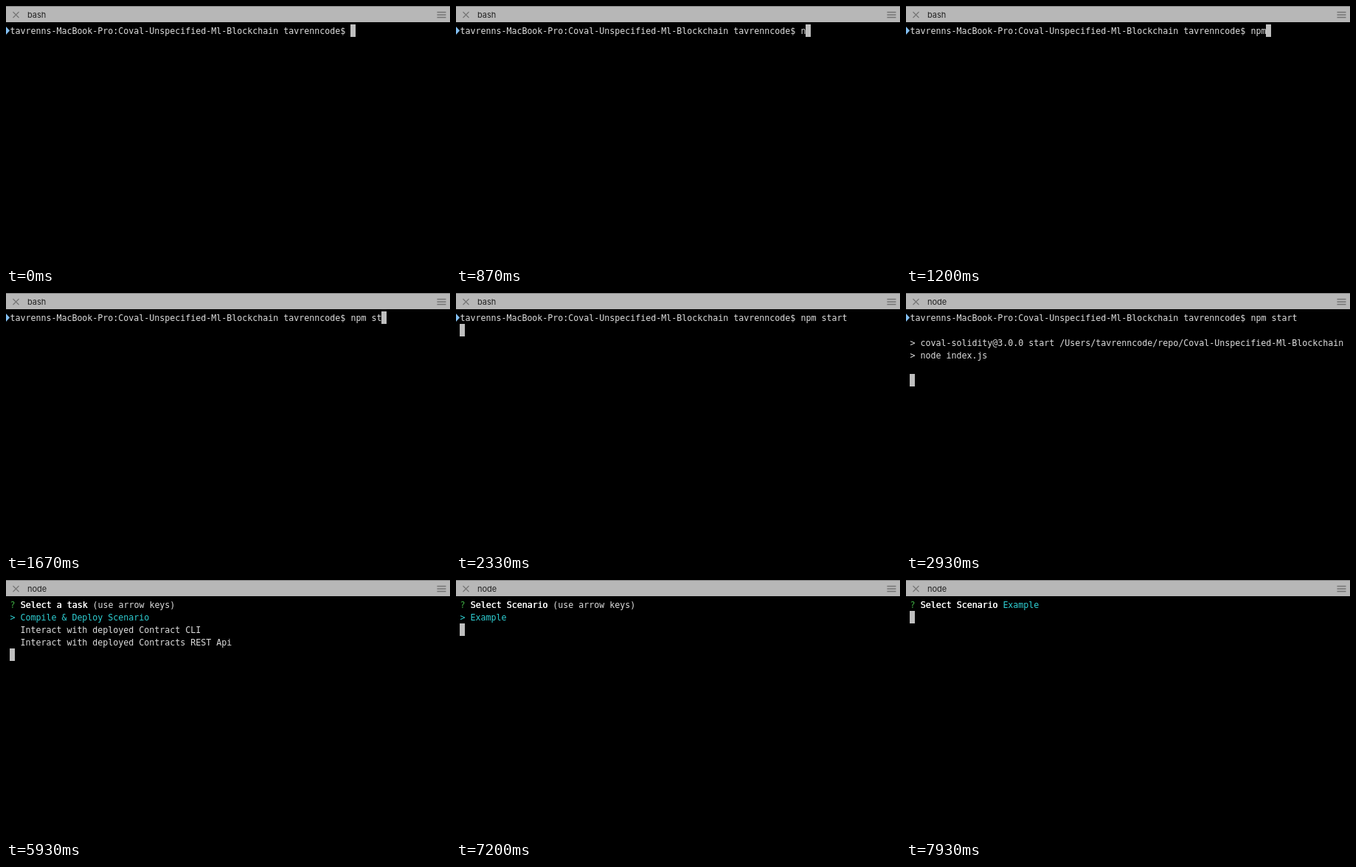
Animation, 602 px wide and 352 px high, one loop 8 s. Source, as an HTML page:

```html
<!DOCTYPE html>
<html lang="en">
<head>
<meta charset="utf-8">
<title>Terminal</title>
<style>
  html, body { margin: 0; width: 100%; height: 100%; overflow: hidden; background: #000; }
  .stage { position: relative; width: 602px; height: 352px; overflow: hidden; background: #000; }
  .stage * { animation-duration: 8s; animation-timing-function: step-end; animation-iteration-count: infinite; }

  .bar { position: absolute; inset: 0 0 auto; height: 22px; box-sizing: border-box; background: #b7b7b7; border-top: 1px solid #858585; }
  .bar svg { position: absolute; left: 0; top: -1px; }
  .tab { position: absolute; left: 29px; top: 3px; font: 11px/16px Inter, sans-serif; color: #202020; }
  .bash { animation-name: bash; }
  .node { animation-name: node; }

  pre { position: absolute; left: 5.4px; top: 26px; margin: 0; color: #dedede;
        font: 11.64px/17px "DejaVu Sans Mono", monospace; font-variant-ligatures: none; }
  b { font-weight: normal; color: #fff; text-shadow: .5px 0 #fff; }
  i { font-style: normal; color: #2fd0d4; }
  u { text-decoration: none; color: #3fae43; }

  .mark { position: absolute; left: 0; top: 28px; width: 5px; height: 11px; background: #82bff3; clip-path: polygon(0 0, 100% 50%, 0 100%); }
  .typed { position: absolute; left: 462px; top: 0; height: 17px; overflow: hidden; animation-name: type; }
  .caret { position: absolute; left: 5px; top: 25px; width: 7px; height: 17px; background: #bfbfbf; animation-name: caret; }

  .shell { animation-name: shell; }
  .log { top: 60px; animation-name: log; }
  .task { animation-name: task; }
  .pick { animation-name: pick; }
  .done { animation-name: done; }

  /* 1% = 80 ms */
  @keyframes bash { 0% { opacity: 1 } 35%, 100% { opacity: 0 } }
  @keyframes node { 0% { opacity: 0 } 35%, 100% { opacity: 1 } }
  @keyframes shell { 0% { opacity: 1 } 74.125%, 100% { opacity: 0 } }
  @keyframes log { 0% { opacity: 0 } 35.875% { opacity: 1 } 74.125%, 100% { opacity: 0 } }
  @keyframes task { 0% { opacity: 0 } 74.125% { opacity: 1 } 90%, 100% { opacity: 0 } }
  @keyframes pick { 0% { opacity: 0 } 90% { opacity: 1 } 99.125%, 100% { opacity: 0 } }
  @keyframes done { 0% { opacity: 0 } 99.125%, 100% { opacity: 1 } }
  @keyframes type {
    0% { width: 0 }
    10.875% { width: 7px }
    12.5% { width: 14px }
    15% { width: 21px }
    16.625% { width: 28px }
    19.125% { width: 35px }
    20.875% { width: 42px }
    23.375% { width: 49px }
    25% { width: 56px }
    27.5%, 100% { width: 64px }
  }
  @keyframes caret {
    0% { transform: translate(462px, 0) }
    10.875% { transform: translate(469px, 0) }
    12.5% { transform: translate(476px, 0) }
    15% { transform: translate(483px, 0) }
    16.625% { transform: translate(490px, 0) }
    19.125% { transform: translate(497px, 0) }
    20.875% { transform: translate(504px, 0) }
    23.375% { transform: translate(511px, 0) }
    25% { transform: translate(518px, 0) }
    27.5% { transform: translate(525px, 0) }
    29.125% { transform: translate(0, 17px) }
    35.875% { transform: translate(0, 85px) }
    74.125% { transform: translate(0, 68px) }
    90% { transform: translate(0, 34px) }
    99.125%, 100% { transform: translate(0, 17px) }
  }
</style>
</head>
<body>
<div class="stage">
  <div class="bar">
    <svg width="602" height="22" fill="none" stroke="#747474">
      <path d="M9.5 8 17.5 16M17.5 8 9.5 16" stroke-width="1.1"/>
      <path d="M584.5 8.5H596.5M584.5 12H596.5M584.5 15.5H596.5" stroke-width="1.7"/>
    </svg>
    <span class="tab bash">bash</span>
    <span class="tab node">node</span>
  </div>

  <div class="shell">
    <div class="mark"></div>
    <pre>tavrenns-MacBook-Pro:Coval-Unspecified-Ml-Blockchain tavrenncode$ <span class="typed">npm start</span></pre>
  </div>

  <pre class="log">&gt; coval-solidity@3.0.0 start /Users/tavrenncode/repo/Coval-Unspecified-Ml-Blockchain
&gt; node index.js</pre>

  <pre class="task"><u>?</u> <b>Select a task</b> (use arrow keys)
<i>&gt; Compile &amp; Deploy Scenario</i>
  Interact with deployed Contract CLI
  Interact with deployed Contracts REST Api</pre>

  <pre class="pick"><u>?</u> <b>Select Scenario</b> (use arrow keys)
<i>&gt; Example</i></pre>

  <pre class="done"><u>?</u> <b>Select Scenario</b> <i>Example</i></pre>

  <div class="caret"></div>
</div>
</body>
</html>
```
